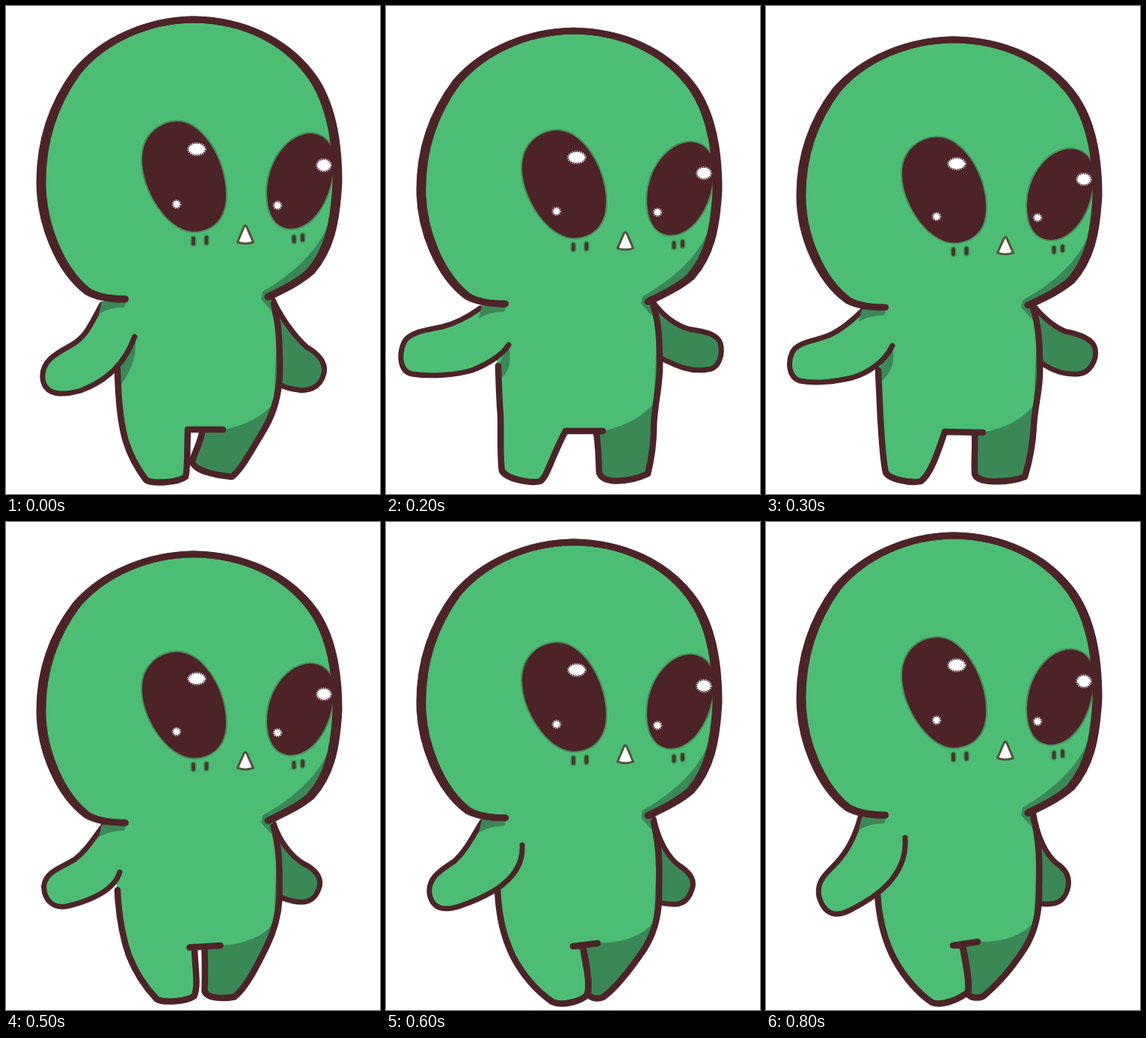
An HTML page for the animation above (0.9 s loop, 500x651 px).

```html
<!DOCTYPE html>
<html lang="en">
<head>
<meta charset="utf-8">
<title>Bouncing alien</title>
<style>
  html, body { margin: 0; width: 100%; height: 100%; overflow: hidden; background: #fff; }
  svg { display: block; width: 100%; height: 100%; }
  .light { fill: #4bbe73; }
  .dark { fill: #3a8856; }
  .ink { fill: #4e2328; }
  .line { fill: none; stroke: #4e2328; stroke-width: 8.5; stroke-linecap: round; stroke-linejoin: round; }
  .head-line { stroke-width: 9; }
  .arm-line { stroke-width: 7; }
  .eye { stroke: #4e2328; stroke-opacity: .3; stroke-width: 4; }
  .lash { fill: none; stroke: #443a2c; stroke-width: 5; stroke-linecap: round; }
  .lash-halo { stroke-width: 8; stroke-opacity: .3; }
  .spark { fill: none; stroke: #fff; stroke-width: 1.6; stroke-dasharray: 1.6 1.4; stroke-opacity: .7; }
</style>
</head>
<body>
<svg viewBox="0 0 500 651">
  <defs>
    <filter id="soft" x="0" y="0" width="500" height="651" filterUnits="userSpaceOnUse">
      <feGaussianBlur stdDeviation=".7"/>
    </filter>
  </defs>
  <g filter="url(#soft)">
    <path class="dark" data-part="armR"/>
    <path class="line arm-line" data-part="armR"/>
    <path class="dark" data-part="legR"/>
    <path class="light" data-part="body"/>
    <path class="dark" data-part="armpit"/>
    <path class="line" data-part="legR"/>
    <path class="line" data-part="legL"/>
    <path class="light" data-part="armL"/>
    <path class="line arm-line" data-part="armL"/>
    <g id="head">
      <path class="dark" d="M128 394L162 390L158 402Q138 402 124 411Z"/>
      <path class="light" data-part="skull"/>
      <path class="dark" d="M438 262C434 305 402 347 343 381L341 391L356 408L352 388C370 379 392 369 409 354C434 325 442 290 445 235Z"/>
      <!-- A slightly narrower second stroke thickens the sides only -->
      <path class="line head-line" data-part="skull"/>
      <path class="line head-line" data-part="skull" transform="translate(4.900 0) scale(.98 1)"/>
      <path class="ink eye" d="M228 154C262 153 294 205 294 252C294 285 275 301 250 301C215 299 182 245 182 205C182 172 205 155 228 154Z"/>
      <path class="ink eye" d="M407 170C427 171 438 185 438 208C437 255 412 297 380 297C358 296 349 275 349 248C350 205 378 171 407 170Z"/>
      <g id="shine"></g>
      <path class="lash lash-halo" d="M250.500 310v7M268 309v7M385 308v6M396.500 306v6"/>
      <path class="lash" d="M250.500 310v7M268 309v7M385 308v6M396.500 306v6"/>
      <path d="M318 295Q320 291 322 295L330.500 315Q320 319 309.500 315Z" fill="#fff" stroke="#55503c" stroke-width="3" stroke-linejoin="round"/>
    </g>
  </g>
</svg>
<script>
const STEP = 100, FLOOR = 651;

const skull = 'M158 391C140 391 122 389 108 381C70 352 45 290 45 235C45 180 62 130 93 88' +
  'C130 44 190 19 250 18C320 19 373 47 406 88C432 120 445 170 445 235C442 290 434 325 409 354C392 369 370 379 352 388';

// squash: vertical scale above the floor; hip: height of the leg shadow; pit: size of the armpit shadow
const pose = (squash, hip, pit, armL, armR, legL, legR) => ({ squash, hip, pit, armL, armR, legL, legR });

const relaxed = pose(1, 530, 22,
  'M128 398C113 425 108 440 88 452C68 463 47 473 49 497C52 520 75 520 100 513C130 502 158 480 172 441',
  'M357 392C365 410 382 437 402 455C420 465 428 478 425 490C420 512 400 514 390 512C382 511 375 510 368 506',
  'M149 483C150 530 154 560 160 580C166 600 178 620 187 632C195 638 230 636 240 628C243 620 242 590 243 565L243 565L290 565',
  'M262 570C257 590 250 600 249 608C252 620 280 626 302 628C315 618 330 590 345 565C357 545 365 520 366 490C366 450 365 420 357 398');
const spread = pose(.976, 530, 16,
  'M126 403C112 413 95 423 75 428C55 432 30 435 24 449C17 465 18 488 35 491C60 495 95 492 115 486C135 478 155 466 164 452',
  'M357 395C368 410 385 425 405 431C425 434 443 437 447 450C451 465 445 484 430 485C405 489 385 478 368 470',
  'M150 480C151 510 151 520 153 545C154 575 152 600 155 620C162 632 195 637 206 634C216 628 222 600 240 567L240 567L290 567',
  'M281 569C284 585 284 600 285 622C288 638 325 636 350 624C356 600 358 580 358 560C359 530 366 510 366 480C366 450 365 420 357 400');
const sinking = pose(.9576, 533, 14,
  'M130 405C115 420 100 432 85 439C65 447 42 448 35 462C29 475 30 495 45 500C70 505 95 500 115 496C135 490 158 476 169 453',
  'M357 399C367 412 383 427 400 434C420 438 437 444 440 457C443 472 433 490 417 491C397 492 382 486 368 476',
  'M150 486C151 510 152 530 153 550C155 580 156 605 160 622C165 632 195 637 207 634C220 625 230 595 239 568L239 568L290 569',
  'M279 571C280 590 278 605 279 624C282 638 325 636 346 628C353 605 357 580 358 560C359 535 367 510 366 485C366 455 365 425 357 405');
const squashed = pose(.9356, 537, 0,
  'M132 410C118 425 108 438 92 448C72 459 48 460 43 478C41 495 48 513 64 513C85 513 105 508 122 503C140 497 166 478 177 453',
  'M358 408C366 422 382 442 402 452C420 459 430 468 429 482C426 500 412 505 402 504C390 504 378 499 368 494',
  'M149 492C150 520 153 550 158 575C163 598 172 618 181 633C187 638 225 639 235 633C241 622 239 595 241 569L241 569L290 568',
  'M267 573C264 590 260 605 261 622C264 636 300 636 321 633C333 622 345 585 353 560C359 540 367 515 366 490C366 460 365 435 357 412');
const rising = pose(.986, 534, 0,
  'M128 400C115 421 107 438 92 452C76 463 56 473 58 495C62 520 83 518 100 512C140 498 185 475 182 431',
  'M358 396C364 425 378 449 393 459C407 468 412 477 410 487C405 505 396 510 386 510C380 510 374 509 367 508',
  'M149 490C151 530 158 555 170 580C185 608 205 628 222 640C235 646 258 640 268 632C275 615 265 585 263 565L250 566L283 562',
  'M264 570C268 590 272 610 270 630C275 637 285 636 290 634C310 620 330 592 345 570C358 550 366 525 365 490C366 455 365 425 357 400');
const tucked = pose(1, 534, 0,
  'M126 394C119 420 108 440 94 455C79 470 67 480 71 500C79 527 96 526 112 518C142 503 190 475 186 421',
  'M358 390C363 420 374 443 388 455C402 464 406 474 404 486C401 502 392 508 383 509C378 510 373 510 367 509',
  'M149 495C151 530 158 557 171 582C185 608 205 630 222 641C235 646 258 637 270 627C273 610 265 585 263 565L250 565L283 560',
  'M264 570C268 590 272 610 270 630C275 636 285 635 290 633C312 615 332 590 345 570C358 550 366 525 365 490C366 450 365 420 357 394');

const numbers = path => path.match(/[\d.]+/g).map(Number);

function halfway(a, b) {
  const mix = (p, q) => {
    if (typeof p === 'number') return (p + q) / 2;
    const other = numbers(q);
    return p.replace(/[\d.]+/g, n => (Number(n) + other.shift()) / 2);
  };
  return Object.fromEntries(Object.keys(a).map(key => [key, mix(a[key], b[key])]));
}

const poses = [relaxed, halfway(relaxed, spread), spread, sinking, squashed,
  halfway(squashed, rising), rising, halfway(rising, tucked), tucked];

// Eye highlights: centre and radii, with a frayed rim
document.getElementById('shine').innerHTML = [[255, 191, 11, 7.5], [228, 264.5, 4.5, 4.5], [425, 212.5, 9, 7.5], [363, 266, 4.5, 4.5]]
  .map(([x, y, rx, ry]) => `<ellipse cx="${x}" cy="${y}" rx="${rx}" ry="${ry}" fill="#fff"/>
    <ellipse class="spark" cx="${x}" cy="${y}" rx="${rx + 1}" ry="${ry + 1}"/>`).join('');

const head = document.getElementById('head');
const parts = document.querySelectorAll('[data-part]');

function draw(p) {
  const [hipX, hipY] = numbers(p.legL);
  const [shoulderX, shoulderY] = numbers(p.armL);
  const [pitX, pitY] = numbers(p.armL).slice(-2);
  const shapes = {
    ...p, skull,
    body: `${p.legL}Q335 ${p.hip + 27} 358 ${p.hip}L362 440L357 402L350 380L140 380L${shoulderX} ${shoulderY}Z`,
    armpit: p.pit ? `M${pitX} ${pitY}L${hipX} ${hipY}l5 ${p.pit}Q${pitX + 6} ${pitY + 30} ${pitX} ${pitY}Z` : ''
  };
  parts.forEach(el => el.setAttribute('d', shapes[el.dataset.part]));
  head.setAttribute('transform', `translate(0 ${FLOOR * (1 - p.squash)}) scale(1 ${p.squash})`);
}

const start = performance.now();
function tick() {
  const step = Math.floor((performance.now() - start) / STEP);
  draw(poses[step % poses.length]);
  requestAnimationFrame(tick);
}
tick();
</script>
</body>
</html>
```
